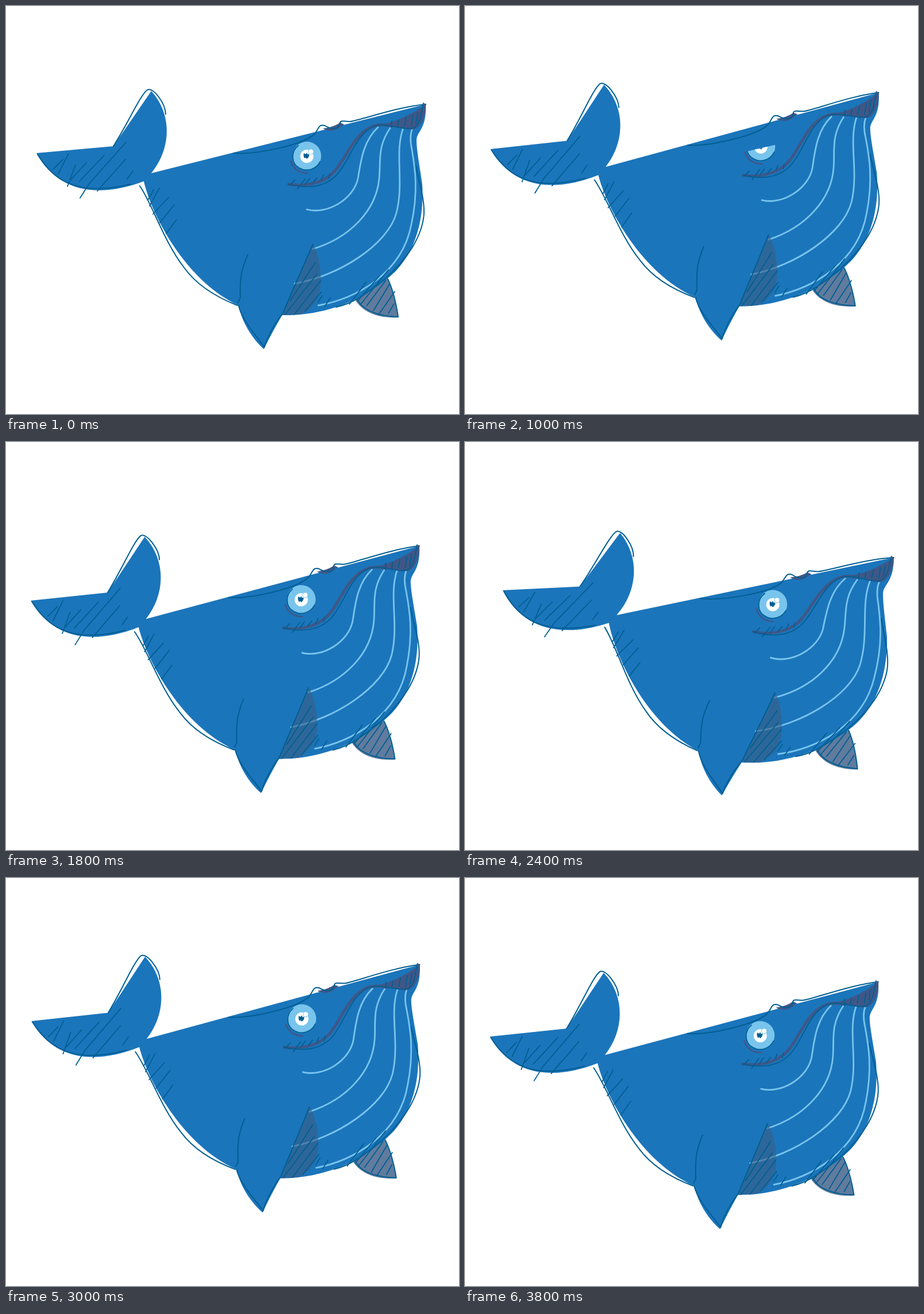
An HTML page with a canvas that plays this animation: 789 px wide and 710 px high, repeating every 4 s.

```html
<!DOCTYPE html>
<html lang="en">
<head>
<meta charset="utf-8">
<title>Whale</title>
<style>
html, body { margin: 0; width: 100%; height: 100%; overflow: hidden; background: #fff; }
canvas { display: block; }
</style>
</head>
<body>
<canvas id="stage" width="789" height="710"></canvas>
<script>
const ctx = document.getElementById('stage').getContext('2d');
const BLUE = '#1b75bb', PEN = '#005f93', LIGHT = '#78c4ec', DARK = '#3f5787', GREY = '#617b9d';
const STEP = 200, LOOP = 4000;

// Tail tip x, y and swim angle in degrees, one row per step of a stroke
const poses = [
  [53, 256, -7.24], [58, 245, -6], [65.8, 258, -4.88], [61, 257.5, -5.1], [52, 254.8, -6.6],
  [44.3, 249, -8.36], [35.4, 263.4, -9.4], [31.2, 278.4, -9.5], [27, 293, -9], [43.2, 276, -8.1]
];
// How far the lid has dropped past the eye's centre during the blink
const lids = { 2: -4, 3: 22, 4: 22, 5: 2.5 };

const body = new Path2D(`M53 256L187 244L253 148C291 190 287 250 253 291L731 171
  C733 214 716 217 715 233C715 250 720 275 725 310C728 360 719 418 680 460
  C640 500 570 540 481 538Q465 565 449 597C428 578 411 550 405 521
  C312 478 253 362 240 305C155 337 88 320 53 256Z`);
const backFin = new Path2D('M608 511C620 531 645 544 683 542Q676 500 663 471Z');
const finShade = new Path2D(`M534 413C551 442 550 486 546 500C540 520 525 532 512 537
  L481 538Q504 485 534 413Z`);

const stripes = [
  'M524 354C560 364 606 335 613 300C618 270 622 235 648 211',
  'M534 423C600 403 645 355 650 300C653 270 646 245 670 211',
  'M503 483C580 470 665 415 680 360C694 305 676 255 692 212',
  'M544 521C610 510 690 465 706 380C719 320 712 280 707 250C703 232 704 222 708 213'
].map(d => new Path2D(d));

const lip = new Path2D('M648 207Q690 201 731 171C733 190 722 211 712 214C698 218 672 207 648 207Z');
const smile = new Path2D('M492 310C512 314 548 312 570 290C593 266 605 220 643 208Q655 205 672 209');
const blowhole = new Path2D('M552 213Q567 222 582 211L589 206L582 203Q570 211 552 213Z');

const outline = new Path2D(`M55 258C85 308 130 331 217 310
  M187 244C213 203 234 155 246 146C256 140 278 170 278 188
  M233 313C255 345 275 410 310 455C335 490 375 510 403 521
  M397 256C440 259 522 240 538 222C545 213 545 205 555 208C565 214 577 217 581 206
  C582 197 588 201 600 201C620 198 680 176 731 171
  M714 278C720 310 729 335 728 362C725 400 700 440 660 475C640 490 610 517 575 524`);
const finLines = new Path2D(`M421 433C410 457 407 475 408 508L404 516
  M405 521C412 550 440 578 450 594C455 575 470 550 482 535C491 513 524 440 534 415
  M612 510C620 530 650 540 683 541Q677 500 665 475`);
const mouthLine = new Path2D(`M492 310C520 317 552 318 575 295C600 268 609 222 642 209
  C664 202 690 217 710 212C722 206 723 187 727 169`);

const hatches = [
  'M99 267L82 284M109 257L91 292M121 277L107 314M140 273L112 303M171 260L128 305',
  'M209 237L145 309L129 334M208 267L159 322M221 287L211 301',
  'M257 320L247 338M267 317L250 348M283 333L256 362M293 346L268 377M297 372L279 396',
  'M503 303L494 312M521 301L508 318M529 300L521 311M542 299L534 308M553 294L549 303M564 292L562 300',
  'M539 446L495 513M542 466L486 537M548 478L502 537M549 498L520 532M551 504L543 516M565 508L555 523',
  'M627 481L598 519M650 470L612 514M666 459L617 520M661 478L628 522M668 484L640 530M677 497L649 537M676 518L666 535',
  'M672 200L671 211M684 199L682 209M697 194L694 208M709 190L706 208M717 185L714 205'
].map(d => new Path2D(d));

function fill(path, color) {
  ctx.fillStyle = color;
  ctx.fill(path);
}

function stroke(path, color, width) {
  ctx.strokeStyle = color;
  ctx.lineWidth = width;
  ctx.stroke(path);
}

function disc(x, y, r, color) {
  ctx.fillStyle = color;
  ctx.beginPath();
  ctx.arc(x, y, r, 0, Math.PI * 2);
  ctx.fill();
}

const pupil = new Path2D('M519 256L522 258L524 255L525 258L528 258Q529 262 524 266L522 264L520 265Q517 260 519 256Z');
const eyeRim = new Path2D('M509 243C496 253 496 274 511 282C525 290 541 283 547 271');
const eyeBag = new Path2D('M496 270C500 284 512 291 525 291');

function drawEye(lid) {
  stroke(eyeBag, DARK, 2.6);
  ctx.save();
  ctx.translate(524, 261);
  ctx.rotate(-12 * Math.PI / 180);
  ctx.beginPath();
  ctx.rect(-40, lid, 80, 90);
  ctx.rotate(12 * Math.PI / 180);
  ctx.translate(-524, -261);
  ctx.clip();
  disc(524, 261, 25, LIGHT);
  stroke(eyeRim, PEN, 1.8);
  disc(524, 261.5, 11.5, '#fff');
  fill(pupil, PEN);
  disc(531, 253.5, 5, LIGHT);
  disc(531, 253.5, 4, '#fff');
  ctx.restore();
}

function drawWhale(lid) {
  fill(backFin, GREY);
  fill(body, BLUE);
  stripes.forEach(s => stroke(s, LIGHT, 2.8));
  fill(finShade, 'rgba(58,94,132,0.6)');
  fill(blowhole, DARK);
  stroke(smile, DARK, 5);
  fill(lip, DARK);
  stroke(outline, PEN, 2);
  stroke(finLines, PEN, 2);
  stroke(mouthLine, PEN, 1.8);
  hatches.forEach(h => stroke(h, PEN, 1.8));
  disc(729, 172, 2.5, DARK);
  drawEye(lid);
}

function draw(now) {
  const step = Math.floor((now % LOOP) / STEP);
  const [x, y, angle] = poses[step % poses.length];
  const [x0, y0, angle0] = poses[0];
  ctx.fillStyle = '#fff';
  ctx.fillRect(0, 0, 789, 710);
  ctx.lineCap = ctx.lineJoin = 'round';
  ctx.save();
  ctx.translate(x, y);
  ctx.rotate((angle - angle0) * Math.PI / 180);
  ctx.translate(-x0, -y0);
  drawWhale(lids[step] ?? -40);
  ctx.restore();
}

const start = performance.now();
function tick() {
  draw(performance.now() - start);
  requestAnimationFrame(tick);
}
tick();
</script>
</body>
</html>
```
